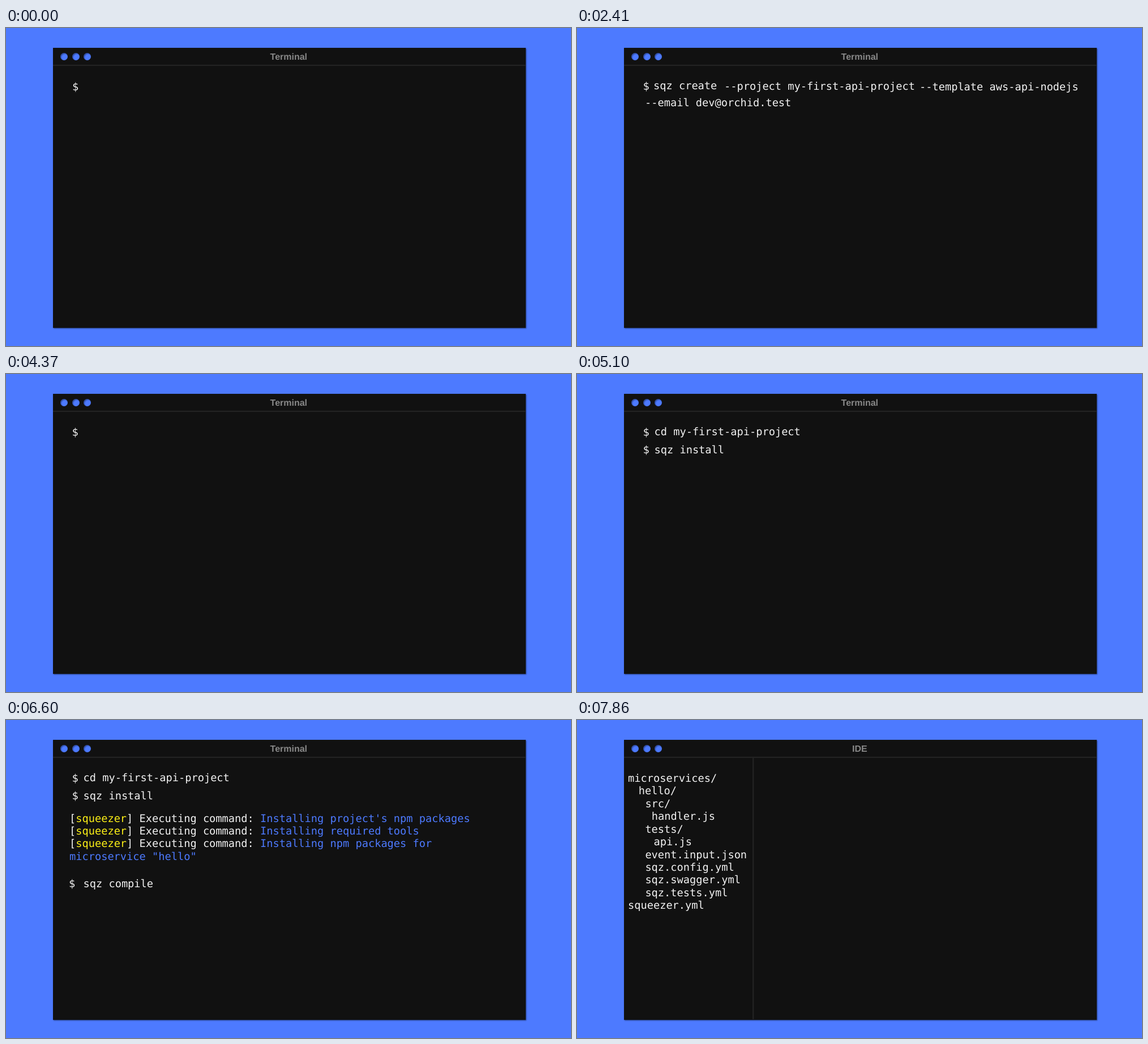
An HTML page for the animation above (8 s loop, 998x561 px).

```html
<!DOCTYPE html>
<html lang="en">
<head>
<meta charset="utf-8">
<title>Terminal</title>
<style>
  html, body { margin: 0; width: 100%; height: 100%; overflow: hidden; background: #4d7aff; }
  div, svg { position: absolute; }
  .window { left: 83px; top: 34.5px; width: 834.5px; height: 494px; background: #111; box-shadow: 1px 1px 2px rgba(0, 0, 0, .55); }
  .dot { width: 13px; height: 13px; border-radius: 50%; background: #4d7aff; box-shadow: inset 1.5px 1.5px 2px rgba(0, 0, 0, .4); }
  svg { left: 0; top: 0; }
  text { font: 18.667px "DejaVu Sans Mono", monospace; fill: #f2f2f2; white-space: pre; text-rendering: geometricPrecision; }
  .title { font: bold 16px "Liberation Sans", Arial, sans-serif; fill: #888; text-anchor: middle; }
  .name { fill: #fbee16; }
  .value { fill: #4d7aff; }
</style>
</head>
<body>
<div class="window"></div>
<div class="dot" style="left:96px;top:43.5px"></div>
<div class="dot" style="left:116.5px;top:43.7px"></div>
<div class="dot" style="left:137px;top:44px"></div>
<svg id="stage" width="998" height="561">
  <rect x="83" y="64.7" width="834.5" height="2.3" fill="#222"/>
</svg>
<script>
const LOOP = 8000;
const IDE = 7860;
const ROW = 22.4;
const stage = document.getElementById('stage');
const items = [];

function add(tag, attrs, parent = stage) {
  const el = document.createElementNS('http://www.w3.org/2000/svg', tag);
  for (const key in attrs) el.setAttribute(key, attrs[key]);
  return parent.appendChild(el);
}

// ~text~ is a yellow name, ^text^ a blue value
function print(from, to, x, y, text, cls = '') {
  const el = add('text', { x, y, class: cls });
  for (const part of text.split(/(~[^~]*~|\^[^^]*\^)/)) {
    if (!part) continue;
    const kind = { '~': 'name', '^': 'value' }[part[0]];
    add('tspan', kind ? { class: kind } : {}, el).textContent = kind ? part.slice(1, -1) : part;
  }
  items.push({ el, from, to });
}

function block(from, to, x, y, lines) {
  lines.forEach((line, i) => line && print(from, to, x, y + i * ROW, line));
}

const tag = '[~squeezer~] ';
const exec = tag + 'Executing command: ';

print(0, IDE, 499.3, 55.7, 'Terminal', 'title');

// version check, then global install
print(0, 2410, 117, 110, '$');
print(200, 1240, 137, 110, 'node -v');
print(570, 1240, 117.7, 138, 'v6.10.3');
print(1240, 2410, 136.3, 110, 'npm i squeezer-cli -g');

// create the project
print(2410, IDE, 116.5, 108.5, '$');
print(2410, 4370, 135, 108.4, 'sqz create');
print(2410, 4370, 260, 109.3, '--project my-first-api-project');
print(2410, 4370, 605, 109.5, '--template aws-api-nodejs');
print(2410, 4370, 120, 137.8, '--email dev@orchid.test');
block(2940, 4370, 111, 196.5, [
  tag + 'Creating project ^my-first-api-project^',
  tag + 'Project successfully created !',
  '',
  "Switch to the project's directory : ^cd my-first-api-project^",
  "Install project's requirements    : ^sqz install^",
  'Compile project                   : ^sqz compile^'
]);

// install and compile
print(4770, IDE, 136.5, 108.2, 'cd my-first-api-project');
print(5100, IDE, 116.5, 139.8, '$');
print(5100, IDE, 136.5, 139.8, 'sqz install');
block(5530, IDE, 112, 179.6, [
  exec + "^Installing project's npm packages^",
  exec + '^Installing required tools^',
  exec + '^Installing npm packages for^',
  '^microservice "hello"^'
]);
print(6230, IDE, 111, 294.5, '$');
print(6600, IDE, 136.5, 294.6, 'sqz compile');
block(7060, IDE, 108, 331.7, [
  tag + 'my-first-api-project contains ^1^ microservice',
  tag + 'Compiling microservice ^hello^',
  exec + '^Linking the microservice source^',
  '^directory to the target dir^'
]);

// file tree
print(IDE, LOOP, 499.3, 55.7, 'IDE', 'title');
items.push({ el: add('rect', { x: 310, y: 67, width: 2.4, height: 461, fill: '#222' }), from: IDE, to: LOOP });
[
  [90, 'microservices/'], [108.7, 'hello/'], [120.4, 'src/'], [131.7, 'handler.js'],
  [120.4, 'tests/'], [135.5, 'api.js'], [120.4, 'event.input.json'], [120.4, 'sqz.config.yml'],
  [120.4, 'sqz.swagger.yml'], [120.4, 'sqz.tests.yml'], [90, 'squeezer.yml']
].forEach(([x, name], i) => print(IDE, LOOP, x, 108.8 + i * 22.45, name));

function draw() {
  const t = performance.now() % LOOP;
  for (const { el, from, to } of items) {
    el.style.visibility = t >= from && t < to ? 'visible' : 'hidden';
  }
  requestAnimationFrame(draw);
}
draw();
</script>
</body>
</html>
```
